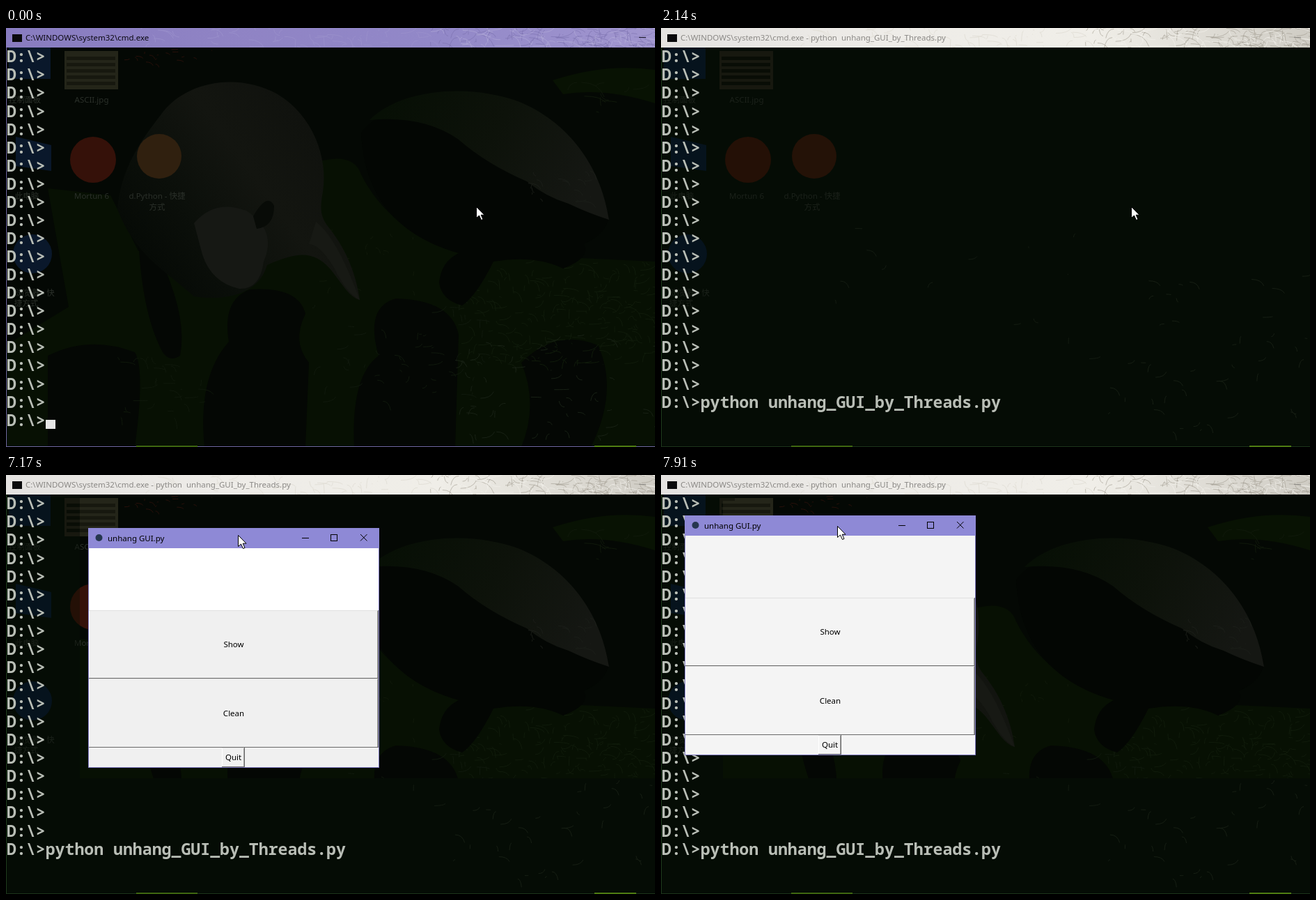
Recreate the animation shown at these times as an HTML page with a canvas. Size 932 by 601 pixels, loop 8000 ms.

```html
<!DOCTYPE html>
<html lang="en">
<head>
<meta charset="utf-8">
<title>Console starting a GUI</title>
<style>
html, body { margin: 0; width: 100%; height: 100%; overflow: hidden; background: #050c05; }
canvas { display: block; }
</style>
</head>
<body>
<canvas id="stage" width="932" height="601"></canvas>
<script>
const W = 932, H = 601, LOOP = 8000;
const UI = '11.5px "Noto Sans", "Noto Sans CJK SC", sans-serif';
const MONO = '600 23.2px "Noto Sans Mono", monospace';
const ROW = 26.07, CELL = 13.94;
const COMMAND = 'python unhang_GUI_by_Threads.py';
const ctx = document.getElementById('stage').getContext('2d');

// Window moves: start time, window x/y, pointer x/y (if shown)
const MOVES = [
  [7020, 862, -29], [7170, 118, 76, 333, 86], [7320, 101, 49, 316, 62],
  [7480, 88, 44, 302, 57], [7630, 64, 38, 277, 54], [7760, 34, 58],
  [7910, 34, 58, 253, 73]
];

function random(seed) {
  return () => (seed = (seed * 16807) % 2147483647) / 2147483647;
}

function rect(g, color, x, y, w, h) {
  g.fillStyle = color;
  g.fillRect(x, y, w, h);
}

function shape(g, color, path) {
  g.fillStyle = color;
  g.fill(new Path2D(path));
}

function disc(g, color, x, y, r) {
  g.fillStyle = color;
  g.beginPath();
  g.arc(x, y, r, 0, 7);
  g.fill();
}

function text(g, str, x, y, color, align = 'left', font = UI) {
  g.font = font;
  g.textAlign = align;
  g.fillStyle = color;
  g.fillText(str, x, y);
}

function blend(g, x0, y0, x1, y1, ...colors) {
  const grad = g.createLinearGradient(x0, y0, x1, y1);
  colors.forEach((c, i) => grad.addColorStop(i / (colors.length - 1), c));
  return grad;
}

// Short bent strokes scattered over a box
function flecks(g, seed, count, x, y, w, h, color, size) {
  const r = random(seed);
  g.strokeStyle = color;
  g.lineWidth = 1;
  g.beginPath();
  for (let i = 0; i < count; i++) {
    const px = x + r() * w, py = y + r() * h, dx = (r() - 0.3) * size, dy = (r() - 0.4) * size;
    g.moveTo(px, py);
    g.quadraticCurveTo(px + dx, py, px + dx * 1.3, py + dy);
  }
  g.stroke();
}

function wallpaper(g) {
  rect(g, '#040804', 0, 0, W, H);
  // Ground, shadows and distant plants
  shape(g, '#071003', 'M60 230 L150 240 L190 320 L455 190 Q500 180 510 210 Q550 290 650 322 L932 335 V601 H0 V455 L90 400 Z');
  shape(g, '#081203', 'M785 75 Q860 50 932 60 V108 Q860 85 800 95 Z');
  shape(g, '#040704', 'M60 470 Q120 440 185 465 Q200 490 185 601 H60 Z M285 601 Q275 500 320 450 Q310 390 350 375 Q420 370 430 410 Q410 450 435 480 L430 601 Z' +
    ' M500 601 Q495 500 535 470 Q515 400 560 388 Q640 390 650 440 L645 601 Z M740 601 Q765 540 740 480 Q790 430 850 455 Q880 520 840 601 Z');
  flecks(g, 5, 16, 170, 30, 190, 24, '#28100a', 12);
  flecks(g, 8, 10, 820, 75, 105, 60, '#10190b', 40);
  flecks(g, 11, 230, 650, 335, 282, 150, '#101b0b', 26);
  flecks(g, 31, 55, 440, 390, 260, 150, '#10190d', 24);
  flecks(g, 17, 55, 645, 440, 287, 155, '#182115', 24);
  flecks(g, 23, 30, 160, 470, 120, 100, '#0f180b', 26);
  flecks(g, 29, 20, 450, 290, 150, 90, '#10190a', 14);
  // Left animal
  shape(g, '#040704', 'M190 300 Q210 280 245 310 L228 345 Q260 420 250 470 Q235 480 225 465 Q195 410 190 300 Z');
  shape(g, blend(g, 170, 320, 430, 130, '#050905', '#0b0f0a', '#131510', '#10120e'),
    'M222 125 C255 78 330 62 390 95 C440 125 463 185 455 235 C450 262 452 272 465 288 C490 320 503 355 508 390 C492 386 482 365 465 345 C442 320 420 320 375 340 C360 390 300 390 270 385 C225 345 185 325 160 260 C165 200 195 160 222 125 Z');
  shape(g, '#161814', 'M270 280 Q300 245 345 262 Q390 290 370 335 Q365 375 335 374 Q295 365 282 325 Z');
  shape(g, '#171914', 'M445 278 Q475 300 508 390 Q490 382 470 342 Q450 310 435 310 Z');
  shape(g, '#080b07', 'M355 270 Q375 235 385 255 Q385 285 360 288 Z');
  // Right animal
  shape(g, '#030603', 'M510 150 C560 90 680 75 750 112 C820 150 850 205 866 270 Q862 295 830 310 Q840 330 800 345 Q760 325 700 335 Q675 385 655 398 Q625 390 622 365 Q625 335 650 323 C570 300 515 250 510 150 Z');
  shape(g, blend(g, 560, 90, 830, 240, '#070f05', '#0d120a', '#151713'),
    'M522 132 C570 85 670 80 740 107 C815 140 855 205 866 275 Q835 265 808 252 Q775 242 748 220 Q690 195 650 160 Q600 125 522 132 Z');
  flecks(g, 41, 18, 750, 205, 95, 45, '#1b1e19', 20);
}

function desktop(g, bright) {
  const c = bright
    ? { blue: '#0a182b', thumb: '#242519', line: '#17180f', red: '#351109', gold: '#30200f', label: '#2b302a' }
    : { blue: '#06131d', thumb: '#17180f', line: '#090d06', red: '#241006', gold: '#241207', label: '#1b211a' };
  rect(g, c.blue, 4, 28, 60, 45);
  shape(g, c.blue, 'M14 156 L65 168 V205 L14 198 Z');
  disc(g, c.blue, 38, 324, 28);
  rect(g, c.thumb, 84, 33, 77, 55);
  for (let i = 0; i < 5; i++) rect(g, c.line, 87, 41 + i * 9, 70, 5);
  disc(g, c.red, 125, 189, 33);
  disc(g, c.gold, 220, 184, 32);
  [['控制面板', 27, 107], ['ASCII.jpg', 123, 107], ['此电脑', 30, 245], ['Mortun 6', 123, 245],
   ['d.Python - 快捷', 217, 245], ['方式', 217, 261], ['浏览器 - 快', 42, 384], ['捷方式', 29, 399]]
    .forEach(([label, x, y]) => text(g, label, x, y, c.label, 'center'));
}

function titleBar(g, active) {
  const colors = active ? ['#887cc0', '#8f83c4', '#9288c8', '#a196cf'] : ['#e4e2e0', '#eeece8', '#f0eee8', '#cfccc4'];
  rect(g, blend(g, 0, 0, W, 0, ...colors), 0, 0, W, 28);
  g.save();
  g.beginPath();
  g.rect(0, 0, W, 28);
  g.clip();
  flecks(g, 3, 60, 190, 0, 420, 28, active ? '#998fcb' : '#e3e0d8', 26);
  g.globalAlpha = 0.6;
  flecks(g, 7, 110, 610, 0, 322, 28, active ? '#7b71ae' : '#a09b90', 30);
  flecks(g, 9, 70, 610, 0, 322, 28, active ? '#b5add9' : '#f6f4ee', 30);
  g.restore();
  rect(g, '#0a0a0c', 9, 9, 14, 11);
  rect(g, active ? '#1b1828' : '#8c8a86', 909, 13, 10, 1);
}

function makeScene(active) {
  const canvas = document.createElement('canvas');
  canvas.width = W;
  canvas.height = H;
  const g = canvas.getContext('2d');
  if (active) {
    wallpaper(g);
  } else {
    rect(g, '#050c05', 0, 0, W, H);
    flecks(g, 13, 45, 645, 335, 280, 255, '#171f14', 20);
    flecks(g, 19, 14, 250, 285, 370, 210, '#141c12', 18);
  }
  desktop(g, active);
  titleBar(g, active);
  rect(g, active ? '#6e66a0' : '#1d3a1c', 0, 28, 1, 573);
  rect(g, active ? '#6e66a0' : '#1c331b', 0, 600, W, 1);
  rect(g, '#3d6410', 187, 599, 88, 2);
  rect(g, '#4d7a12', 845, 599, 60, 2);
  return canvas;
}

const activeScene = makeScene(true), idleScene = makeScene(false);

function reveal(x, y, w, h) {
  ctx.drawImage(activeScene, x, y, w, h, x, y, w, h);
}

function consoleText(rows, command) {
  for (let i = 0; i < rows; i++) {
    const last = i === rows - 1;
    text(ctx, 'D:\\>' + (last ? command : ''), 1, 49.3 + i * ROW, '#b9beb6', 'left', MONO);
  }
}

function caret(column) {
  rect(ctx, '#e6e6e6', Math.round(1 + column * CELL), 562, 14, 13);
}

function pointer(x, y) {
  ctx.save();
  ctx.translate(x + 0.5, y + 0.5);
  const arrow = new Path2D('M0 0 V16 L4 12.5 L7 19 L9.5 18 L6.7 11.7 H11.5 Z');
  ctx.fillStyle = '#fff';
  ctx.strokeStyle = '#000';
  ctx.lineWidth = 1;
  ctx.fill(arrow);
  ctx.stroke(arrow);
  ctx.restore();
}

function textPointer(x, y) {
  rect(ctx, '#d8d8d8', x, y, 7, 1);
  rect(ctx, '#d8d8d8', x + 3, y, 1, 16);
  rect(ctx, '#d8d8d8', x, y + 15, 7, 1);
}

function button(label, x, y, w, h, face) {
  rect(ctx, face, x, y, w, h);
  rect(ctx, '#e0e0e0', x, y, w, 1);
  rect(ctx, '#fff', x, y + 1, 1, h - 2);
  rect(ctx, '#a0a0a0', x + w - 2, y + 1, 1, h - 1);
  rect(ctx, '#696969', x + w - 1, y, 1, h);
  rect(ctx, '#696969', x, y + h - 1, w, 1);
  text(ctx, label, x + w / 2, y + h / 2 + 4, '#000', 'center');
}

function guiWindow(x, y, face, field) {
  ctx.save();
  ctx.translate(x, y);
  rect(ctx, '#827cc4', 0, 0, 418, 344);
  rect(ctx, '#8e89d6', 0, 0, 418, 29);
  rect(ctx, face, 1, 29, 416, 314);
  rect(ctx, field, 2, 29, 415, 89);
  disc(ctx, '#25364f', 15.5, 14, 5);
  text(ctx, 'unhang GUI.py', 28, 18.5, '#000');
  rect(ctx, '#000', 307, 14, 10, 1);
  ctx.strokeStyle = '#000';
  ctx.lineWidth = 1;
  ctx.strokeRect(348.5, 9.5, 9, 9);
  ctx.stroke(new Path2D('M391 9 L400.5 18.5 M400.5 9 L391 18.5'));
  button('Show', 1, 118, 416, 98, face);
  button('Clean', 1, 216, 416, 99, face);
  button('Quit', 192, 315, 33, 28, face);
  ctx.restore();
}

function draw(t) {
  const started = t >= 1990, active = t < 2140;
  ctx.drawImage(active ? activeScene : idleScene, 0, 0);
  text(ctx, 'C:\\WINDOWS\\system32\\cmd.exe' + (started ? ' - python  unhang_GUI_by_Threads.py' : ''),
    28, 18, active ? '#0c0a14' : '#8b8986');

  const move = MOVES.filter(m => m[0] <= t).pop();
  if (t >= 3100) reveal(675, 218, 219, 56);
  if (t >= 7020) reveal(846, 28, 86, 296);
  if (t >= 7170) reveal(106, 28, 826, 407);
  if (t >= 7320) reveal(89, 37, 447, 398);

  consoleText(started ? 20 : 21, t >= 850 ? COMMAND : '');
  if (t < 850) caret(4);
  else if (!started && (t < 1280 || t >= 1720)) caret(35);
  else if (started && active) caret(0);

  if (t < 3100) pointer(675, 256);
  else if (t < 3250) textPointer(886, 218);

  if (move) {
    const [, x, y, px, py] = move, dragged = t >= 7320;
    guiWindow(x, y, dragged ? '#f4f4f4' : '#f0f0f0', dragged ? '#f4f4f4' : '#fff');
    if (px) pointer(px, py);
  }
}

function frame() {
  draw(performance.now() % LOOP);
  requestAnimationFrame(frame);
}
frame();
</script>
</body>
</html>
```
